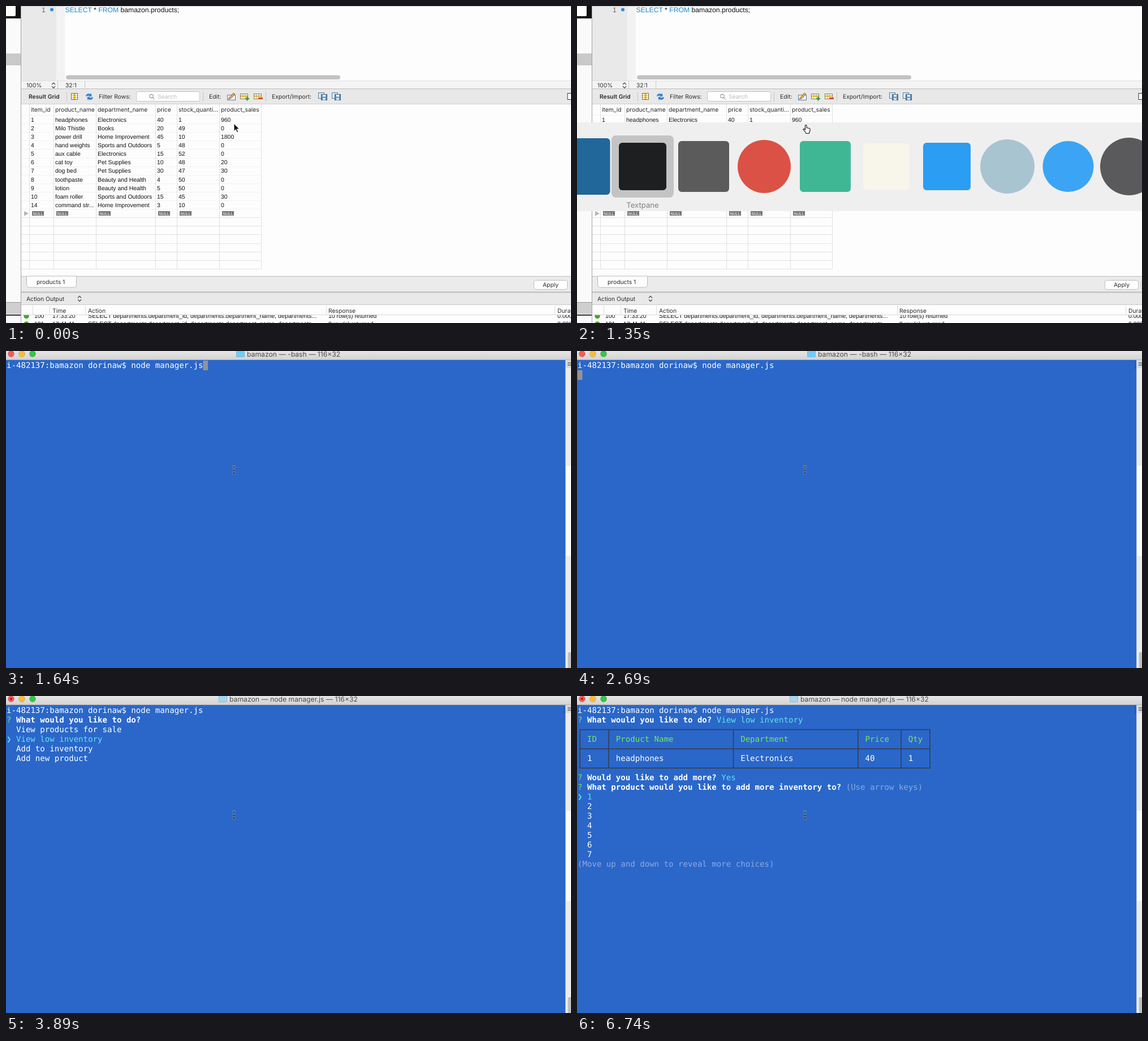
These frames come from a looping animation (999x561 px, 8000 ms). An HTML page:

```html
<!DOCTYPE html>
<html lang="en">
<head>
<meta charset="utf-8">
<title>Store manager demo</title>
<style>
  html, body { margin: 0; width: 100%; height: 100%; overflow: hidden; background: #fff; }
  svg { display: block; width: 100vw; height: 100vh; }
  text { white-space: pre; text-rendering: geometricPrecision; }
  .ui { font: 10.3px Inter, Roboto, sans-serif; fill: #2b2b2b; }
  .cell { font: 10.45px "Liberation Sans", sans-serif; fill: #111; }
  .sql { font: 12.2px "Liberation Sans", sans-serif; fill: #111; }
  .title { font: 12.2px Inter, Roboto, sans-serif; fill: #4a4a4a; }
  .mono { font: 14.08px "DejaVu Sans Mono", monospace; fill: #fff; }
  .label { font: 13.1px Inter, Roboto, sans-serif; text-anchor: middle; }
  .bold { font-weight: 700; }
  .green { fill: #74e85f; }
  .cyan { fill: #60e3ee; }
  .dim { fill: #91a9df; }
</style>
</head>
<body>
<svg id="stage" viewBox="0 0 999 561" preserveAspectRatio="none" xmlns="http://www.w3.org/2000/svg"></svg>
<script>
const LOOP = 8000;
const rect = (x, y, w, h, fill, more = '') =>
  `<rect x="${x}" y="${y}" width="${w}" height="${h}" fill="${fill}" ${more}/>`;
const circle = (x, y, r, fill, more = '') => `<circle cx="${x}" cy="${y}" r="${r}" fill="${fill}" ${more}/>`;
const path = (d, fill, stroke = 'none', more = '') => `<path d="${d}" fill="${fill}" stroke="${stroke}" ${more}/>`;
const text = (x, y, str, cls = 'ui', more = '') => `<text x="${x}" y="${y}" class="${cls}" ${more}>${str}</text>`;
const hline = (y, color, x = 27, x2 = 999) => rect(x, y, x2 - x, 1, color);
const vline = (x, y, y2, color) => rect(x, y, 1, y2 - y, color);
const group = (id, body) => `<g id="${id}">${body}</g>`;

// Database window
const COLUMNS = [
  [44, 'item_id'], [87, 'product_name'], [162, 'department_name'],
  [267, 'price'], [305, 'stock_quanti...'], [380, 'product_sales'],
];
const PRODUCTS = [
  '1|headphones|Electronics|40|1|960',
  '2|Milo Thistle|Books|20|49|0',
  '3|power drill|Home Improvement|45|10|1800',
  '4|hand weights|Sports and Outdoors|5|48|0',
  '5|aux cable|Electronics|15|52|0',
  '6|cat toy|Pet Supplies|10|48|20',
  '7|dog bed|Pet Supplies|30|47|30',
  '8|toothpaste|Beauty and Health|4|50|0',
  '9|lotion|Beauty and Health|5|50|0',
  '10|foam roller|Sports and Outdoors|15|45|30',
  '14|command str...|Home Improvement|3|10|0',
];
const ROW = 15.1;

const stepper = (x, y) =>
  path(`M${x - 3} ${y - 1.5}l3-3.2 3 3.2M${x - 3} ${y + 1.5}l3 3.2 3-3.2`, 'none', '#444', 'stroke-width="1.2"');

function tableIcon(x, badge) {
  return rect(x + .5, 155.5, 13, 9, '#fff', 'stroke="#8a7a4a"') + rect(x + 1, 158, 12, 3, '#f0c543') +
    path(`M${x + 5} 155v10M${x + 9} 155v10`, 'none', '#a9965a', 'stroke-width=".8"') + badge;
}

function diskIcon(x) {
  return rect(x + .5, 153.5, 10, 10, '#dce8f2', 'stroke="#5b7f9e"') +
    rect(x + 5.5, 156.5, 10, 10, '#5c8fb8', 'stroke="#3c6688"') +
    rect(x + 8, 157, 5, 3.5, '#fff') + rect(x + 8, 162.5, 5, 4, '#d8e4ee');
}

function toolbar() {
  return rect(27, 146, 972, 28, '#e8e8e8') + hline(146, '#bdbdbd') + hline(173, '#cfcfcf') +
    text(40, 164, 'Result Grid', 'ui', 'font-weight="600" style="font-weight:600"') +
    vline(107, 152, 169, '#c4c4c4') + vline(348, 152, 169, '#c4c4c4') +
    rect(115.5, 154.5, 11, 11, '#fff', 'stroke="#77703f"') + rect(119, 155, 4, 10, '#f2c230') +
    path('M116 158h10M116 162h10', 'none', '#998d50', 'stroke-width=".7"') +
    path('M141 160a5 5 0 0 1 8-4l1.5-2 1 6h-6l2-2M154 161a5 5 0 0 1-8 4l-1.5 2-1-6h6l-2 2', '#3183d0') +
    text(164, 164, 'Filter Rows:') +
    rect(230.5, 151.5, 112, 17, '#fff', 'rx="3" stroke="#c3c3c3"') +
    circle(257, 159.5, 3.4, 'none', 'stroke="#777"') + path('M259.5 162l3 3.5', 'none', '#777') +
    text(268, 164, 'Search', 'ui', 'style="fill:#bcbcbc"') +
    text(359, 164, 'Edit:') +
    rect(391.5, 157.5, 14, 9, '#e9f1f8', 'stroke="#5f7f9b"') +
    path('M394 163l8-9 3 2-8 8-4 1z', '#eea23a', '#555', 'stroke-width=".7"') +
    tableIcon(414, path('M423 164h7M426.5 160.5v7', 'none', '#3d9b35', 'stroke-width="2.5"')) +
    tableIcon(438, path('M446 163.5h8', 'none', '#d2493a', 'stroke-width="3"')) +
    vline(459, 152, 169, '#c4c4c4') +
    text(470, 164, 'Export/Import:') + diskIcon(552) + diskIcon(576) +
    rect(993, 154.5, 12, 11, '#fff', 'stroke="#333"');
}

function grid() {
  let out = rect(27, 174, 972, 304, '#fdfdfd');
  for (let i = 0; i <= 18; i++) out += hline(Math.round(193 + i * ROW), i < 12 ? '#f1f1f1' : '#e3e3e3', 27, 451);
  out += [41, 84, 159, 264, 302, 377, 451].map(x => vline(x, 174, 465, '#dfdfdf')).join('');
  out += COLUMNS.map(([x, name]) => text(x, 187, name)).join('');
  PRODUCTS.forEach((row, i) => row.split('|').forEach((value, c) => {
    out += text(COLUMNS[c][0], 204.8 + i * ROW, value, 'cell');
  }));
  COLUMNS.forEach(([x]) => {
    out += rect(x + 2, 363, 21, 8, '#777') +
      text(x + 3.5, 369.7, 'NULL', 'cell', 'style="font-size:7px;fill:#fff"');
  });
  return out + path('M32 363l8 4.2-8 4.2z', '#b5b5b5');
}

const LOG_QUERY = 'SELECT departments.department_id, departments.department_name, departments...';

function logRow(y, id, time, reply) {
  return circle(36, y - 2, 4.8, '#4aa52e') + text(50, y + 1, id, 'cell') + text(82, y + 1, time, 'cell') +
    text(145, y + 1, LOG_QUERY, 'cell', 'style="font-size:10.7px"') + text(570, y + 1, reply, 'cell') +
    text(975, y + 1, '0.00057', 'cell');
}

function database() {
  const side = rect(0, 0, 26, 561, '#fafafa') + rect(0, 0, 26, 22, '#111') +
    rect(-10, -6, 27, 24, '#fff', 'rx="2"') + rect(0, 84, 26, 21, '#c9c9c9') +
    rect(0, 525, 26, 20, '#cfcfcf') + hline(524, '#999', 0, 26) + rect(0, 546, 26, 2, '#333');
  const editor = rect(27, 0, 972, 132, '#fdfdfd') + rect(27, 0, 62, 132, '#e9e9e9') + rect(89, 0, 15, 132, '#f3f3f3') +
    hline(0, '#d0d0d0') + text(63, 10.5, '1', 'sql', 'style="fill:#666"') + circle(81, 6.5, 3, '#2b8be0') +
    text(104.5, 10.5, '<tspan fill="#1b87cc">SELECT</tspan> * <tspan fill="#1b87cc">FROM</tspan> bamazon.products;', 'sql') +
    rect(106, 122.5, 485, 7.5, '#c2c2c2', 'rx="3.7"') +
    rect(27, 132, 972, 14, '#f4f4f4') + hline(132, '#dedede') +
    text(36, 143.5, '100%') + stepper(84, 140.5) + vline(91, 133, 146, '#c9c9c9') +
    text(105, 143.5, '32:1') + vline(139, 133, 146, '#c9c9c9');
  const tabs = rect(27, 478, 972, 29, '#ebebeb') + hline(478, '#bcbcbc') +
    path('M36.5 478v15q0 5 5 5h78q5 0 5-5v-15z', '#fdfdfd', '#b9b9b9') + text(54, 491.5, 'products 1') +
    rect(933.5, 485.5, 59, 16, '#fff', 'rx="3" stroke="#bdbdbd"') + text(949, 497, 'Apply') +
    rect(997.5, 485.5, 40, 16, '#fff', 'rx="3" stroke="#bdbdbd"') + rect(27, 505, 972, 3, '#c9c9c9');
  const log = rect(27, 548, 972, 13, '#fdfdfd') +
    logRow(550.5, '100', '17:33:20', '10 row(s) returned') +
    logRow(565, '101', '17:41:11', '8 row(s) returned') +
    rect(27, 508, 972, 21, '#e9e9e9') + text(36, 521.5, 'Action Output') + stepper(130, 518) +
    rect(27, 529, 972, 18, '#fdfdfd') + hline(528, '#c8c8c8') + hline(546, '#d6d6d6') +
    [47, 77, 140, 566, 970].map(x => vline(x, 530, 547, '#dcdcdc')).join('') +
    text(82, 542.5, 'Time') + text(145, 542.5, 'Action') + text(570, 542.5, 'Response') + text(975, 542.5, 'Duration');
  return side + editor + toolbar() + grid() + tabs + log + vline(26, 0, 561, '#a3a3a3');
}

// Command window
const CHAR = 8.476, LINE = 17;
const col = c => 1 + c * CHAR;
const put = (row, c, str, cls = '') => text(col(c).toFixed(2), 30 + row * LINE, str, 'mono ' + cls);
const ask = (row, question, answer = '', cls = 'cyan') =>
  put(row, 0, '?', 'green') + put(row, 2, question, 'bold') + put(row, question.length + 3, answer, cls);
const choices = (row, items, active = 0) => items.map((item, i) =>
  (i === active ? put(row + i, 0, '❯', 'cyan') : '') + put(row + i, 2, item, i === active ? 'cyan' : '')).join('');
const block = (c, row) => rect(col(c), 17 + row * LINE, CHAR, LINE, '#939499');

const TODO = 'What would you like to do?', MORE = 'Would you like to add more?';
const HINT = '(Use arrow keys)';
const MENU = ['View products for sale', 'View low inventory', 'Add to inventory', 'Add new product'];

function stockTable() {
  const left = col(.5), right = col(73.5);
  const edges = [0, 6, 32, 58, 67, 73].map(c => `M${col(c + .5)} 59.5v68`).join('');
  const rules = [59.5, 93.5, 127.5].map(y => `M${left - .7} ${y}H${right + .7}`).join('');
  const stops = [2, 8, 34, 60, 69];
  const cells = (row, values, cls) => values.map((v, i) => put(row, stops[i], v, cls)).join('');
  return path(edges + rules, 'none', '#363b46', 'stroke-width="1.5"') +
    cells(3, ['ID', 'Product Name', 'Department', 'Price', 'Qty'], 'green') +
    cells(5, ['1', 'headphones', 'Electronics', '40', '1']);
}

function shell() {
  return rect(0, 0, 999, 561, '#2a67c9') + rect(0, 0, 999, 15, 'url(#bar)') + hline(15, '#b4b4b4', 0) +
    ['#fb5b52', '#fdbc38', '#34c748'].map((fill, i) =>
      circle(9 + i * 19, 5, 5.5, fill, 'stroke="#0003" stroke-width=".8"')).join('') +
    rect(990, 16, 9, 545, '#ececec') + rect(990, 203, 9, 160, '#fbfbfb') + vline(989, 16, 561, '#c9d0dc') +
    rect(990, 16, 9, 14, '#dadada') + path('M993 20.5h6M993 23h6M993 25.5h6', 'none', '#555') +
    rect(993.5, 533, 8, 34, '#bfbfbf', 'rx="3"') +
    put(0, 0, 'i-482137:bamazon dorinaw$ node manager.js');
}

const folder = (x, fill) => rect(x + .5, -1, 14, 11.5, fill, 'rx="1" stroke="#6eb4d6" stroke-width=".8"');

// App switcher: every app is one plain shape
const APPS = [
  ['square', 8.5, 50, '#22679a'], ['square', 116, 42, '#1d1f21'], ['square', 224, 45, '#5b5b5c'],
  ['circle', 331, 47, '#dc5145'], ['square', 439, 45, '#3fb795'], ['square', 547, 41, '#f8f5ea'],
  ['square', 654, 42, '#2b9df2'], ['circle', 761, 48, '#a8c4d0'], ['circle', 868.5, 45, '#3ba4f4'],
  ['circle', 976, 51, '#5a5a5c'],
];
const icons = () => APPS.map(([kind, x, r, fill]) => kind === 'circle'
  ? circle(x, 284, r, fill) : rect(x - r, 284 - r, 2 * r, 2 * r, fill, 'rx="6"')).join('');
const highlight = (x, fill) => rect(x - 55, 229, 110, 110, fill, 'rx="8"');
const label = (x, str, fill) => text(x, 356.5, str, 'label', `fill="${fill}"`);
const switcher = (panel, mark, opacity = 1) => panel + mark + `<g opacity="${opacity}">${icons()}</g>`;

const grayPanel = rect(0, 206, 999, 157, '#efefef');
const bluePanel = rect(0, 206, 999, 157, '#317ae7') +
  path('M970 206Q964 284 970 363H999V206z', '#3f8cee') + rect(990, 206, 9, 157, '#8caae9');

// Pointers
const arrow = path('M403 208v13.5l3.2-2.9 2.3 5 2.1-1-2.2-4.8h4.2z', '#111', '#fff', 'stroke-width=".9"');
const hand = path('M403.5 219v-7q0-1.5 1.3-1.5t1.3 1.5v3.5l4.8 1q1.6.4 1.4 2l-.8 4-1 3h-5.5l-1.5-3-3.5-4q.3-1.8 2-.8z',
  '#fff', '#111', 'stroke-width="1.1"');
const beam = ['#fff9', '#101828'].map((color, i) =>
  path('M400.5 204q2.5 0 2.5 2v9q0 2-2.5 2M405.5 204q-2.5 0-2.5 2M403 215q0 2 2.5 2M401 211.5h4', 'none', color,
    `stroke-width="${i ? 1.1 : 2.4}"`)).join('');

// id, markup, visible from, visible until
const LAYERS = [
  ['database', database(), 0, 1490],
  ['shell', shell(), 1490, LOOP],
  ['shellTitle', folder(407, '#70cbfb') + text(426, 9.7, 'bamazon — -bash — 116×32', 'title'), 1490, 2840],
  ['nodeTitle', folder(376, '#a6d6ec') + text(395, 9.7, 'bamazon — node manager.js — 116×32', 'title') +
    circle(9, 5, 1.8, '#7c1410'), 2840, LOOP],
  ['cursorTop', block(41, 0), 1490, 2690],
  ['cursorNext', block(0, 1), 2690, 3440],
  ['lineMark', path('M985 18.5h2v12h-2', 'none', '#1f4f9f'), 2690, LOOP],
  ['menuFirst', ask(1, TODO, HINT, 'dim') + choices(2, MENU), 3440, 3890],
  ['menuSecond', ask(1, TODO) + choices(2, MENU, 1), 3890, 4490],
  ['stock', ask(1, TODO, MENU[1]) + stockTable(), 4490, LOOP],
  ['askMore', ask(7, MORE, HINT, 'dim') + choices(8, ['Yes', 'No']), 4490, 6740],
  ['askProduct', ask(7, MORE, 'Yes') + ask(8, 'What product would you like to add more inventory to?', HINT, 'dim') +
    choices(9, [1, 2, 3, 4, 5, 6, 7]) + put(16, 0, '(Move up and down to reveal more choices)', 'dim'), 6740, LOOP],
  ['switchStart', switcher(grayPanel, highlight(6, '#c4c4c4')), 750, 1350],
  ['switchNext', switcher(grayPanel, highlight(116, '#c4c4c4') + label(116, 'Textpane', '#808080')), 1350, 1490],
  ['switchFade', switcher(bluePanel, highlight(116, '#1b60cd') + label(116, 'Textpane', '#0d49aa'), .6), 1490, 1640],
  ['arrow', arrow, 0, 750],
  ['hand', hand, 750, 1640],
  ['beam', beam, 1640, LOOP],
];

const stage = document.getElementById('stage');
stage.innerHTML = `<defs><linearGradient id="bar" x2="0" y2="1">
  <stop stop-color="#e6e6e6"/><stop offset="1" stop-color="#d3d3d3"/></linearGradient></defs>` +
  LAYERS.map(([id, body]) => group(id, body)).join('');
const timeline = LAYERS.map(([id, , from, until]) => ({ node: document.getElementById(id), from, until }));

function update(t) {
  for (const { node, from, until } of timeline) {
    node.style.display = t >= from && t < until ? '' : 'none';
  }
}

const start = performance.now();
function tick() {
  update((performance.now() - start) % LOOP);
  requestAnimationFrame(tick);
}
tick();
</script>
</body>
</html>
```
